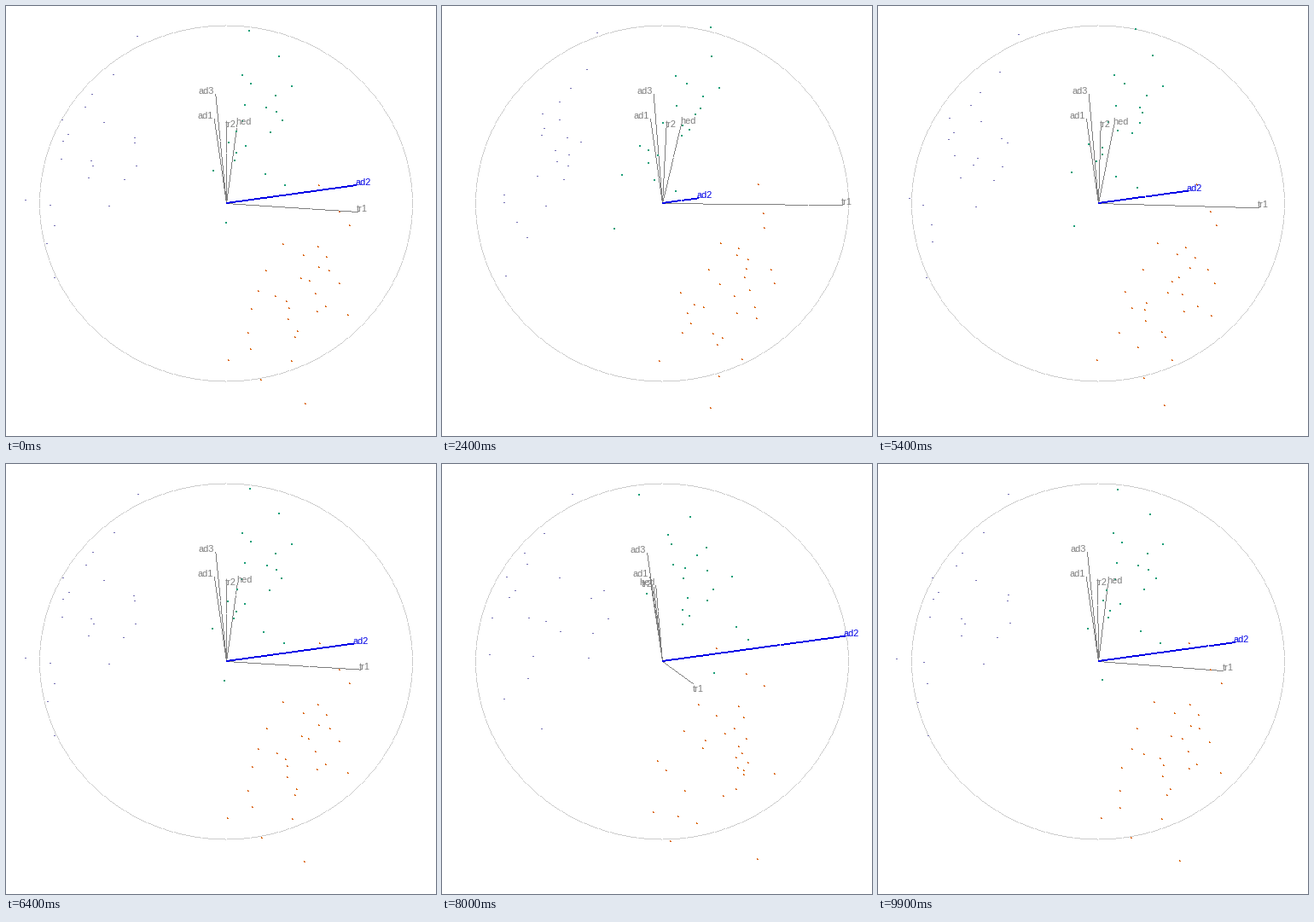
A matplotlib script for the animation above (10000 ms loop, 504x504 px).

```python
import numpy as np
import matplotlib.pyplot as plt
from matplotlib.animation import FuncAnimation

plt.rcParams["font.family"] = "Liberation Sans"

SIZE = 504
CX, CY = 257, 231
RX, RY = 218.5, 208.5
SLOPE = 0.144                    # direction of the manipulated variable
SKEW, LIFT = SLOPE * RX / RY, SLOPE * RY / RX
REACH = RX / np.hypot(1, SLOPE)

# Tour angle: out of the plane, fully into it, then back to the start.
START = 0.79
PHI = np.concatenate([
    np.linspace(START, np.pi / 2, 17),
    np.linspace(np.pi / 2, 0, 32),
    np.linspace(0, START, 17)[:-1],
])

# name: (in-plane part, out-of-plane part, constant height)
AXES = {
    "tr1": (0, 210, -30.5),
    "tr2": (0, 18, 87),
    "ad1": (0, 1, 99),
    "ad2": (REACH, 0, 0),
    "ad3": (0, 9, 127),
    "hed": (0, 36, 88),
}

# Pixels that make up one dot of each species.
SQUARE = [(0, 0), (1, 0), (0, 1), (1, 1)]
TRIANGLE = [(0, 0), (0, 1), (1, 1)]
DASH = [(0, 0), (1, 0)]

# Means, slopes against height, and spreads of the three parts.
SPECIES = [
    dict(color="#1b9e77", dot=SQUARE, n=21, mean=(42, 25, 87),
         slope=(-0.24, 0.53), spread=(32, 28, 53)),
    dict(color="#d95f02", dot=TRIANGLE, n=31, mean=(41, 47, -117),
         slope=(0.13, 0.49), spread=(45, 30, 55)),
    dict(color="#7570b3", dot=DASH, n=22, mean=(-117, -99, 74),
         slope=(0, 0.55), spread=(42, 20, 64)),
]

rng = np.random.default_rng(11)


def cluster(n, mean, slope, spread):
    """Heights at even logistic quantiles, the other parts scattered."""
    q = (np.arange(n) + 0.5) / n
    rise = spread[2] * 0.55 * np.log(q / (1 - q))
    noise = np.clip(rng.normal(size=(2, n)), -1.8, 1.8)
    a, b = (mean[i] + slope[i] * rise + spread[i] * noise[i] for i in (0, 1))
    return a, b, mean[2] + rise


def project(a, b, height, phi):
    r = a * np.cos(phi) + b * np.sin(phi)
    return CX + r - SKEW * height, CY - height - LIFT * r


def trace(xs, ys):
    """Whole pixels along a polyline, one per step of the longer side."""
    px, py = [], []
    for x0, y0, x1, y1 in zip(xs, ys, xs[1:], ys[1:]):
        n = int(max(abs(x1 - x0), abs(y1 - y0))) + 1
        px.append(np.rint(np.linspace(x0, x1, n)))
        py.append(np.rint(np.linspace(y0, y1, n)))
    return np.concatenate(px), np.concatenate(py)


def stamp(x, y, dot):
    """Pixel centres of a small pattern repeated at every position."""
    x, y = np.rint(x), np.rint(y)
    return (np.concatenate([x + dx + 0.5 for dx, _ in dot]),
            np.concatenate([y + dy + 0.5 for _, dy in dot]))


fig = plt.figure(figsize=(7, 7), dpi=72, facecolor="white")
ax = fig.add_axes([0, 0, 1, 1])
ax.set(xlim=(0, SIZE), ylim=(SIZE, 0))
ax.axis("off")


def pixels(color, zorder):
    return ax.plot([], [], ls="", marker=",", color=color, zorder=zorder)[0]


turn = np.linspace(0, 2 * np.pi, 121)
rim = trace(CX - 0.5 + RX * np.cos(turn), CY + RY * np.sin(turn))
pixels("#cccccc", 1).set_data(*stamp(*rim, [(0, 0)]))

arms = []
for name, parts in AXES.items():
    main = name == "ad2"
    color = "#0000e6" if main else "#7f7f7f"
    label = ax.text(0, 0, name, color=color, size=11, va="baseline", zorder=5)
    pen = [(0, 0), (0, -1)] if main else [(0, 0)]
    arms.append((pixels(color, 3 if main else 2), pen, label, parts))

clouds = [
    (pixels(s["color"], 4), s["dot"],
     cluster(s["n"], s["mean"], s["slope"], s["spread"]))
    for s in SPECIES
]


def place_label(label, x, y):
    """Push the label away from the middle of the stage."""
    off = x - SIZE / 2
    side = "center" if abs(off) < 0.75 else "left" if off > 0 else "right"
    label.set_ha(side)
    label.set_position((x, y + (10 if y > SIZE / 2 else 0)))


def draw(tick):
    # Double-length steps for the first seven seconds.
    phi = PHI[tick // 2 if tick < 70 else tick - 35]
    for line, pen, label, parts in arms:
        x, y = project(*parts, phi)
        line.set_data(*stamp(*trace([CX, x], [CY, y]), pen))
        place_label(label, x, y)
    for dots, dot, parts in clouds:
        dots.set_data(*stamp(*project(*parts, phi), dot))
    return []


anim = FuncAnimation(fig, draw, frames=100, interval=100, repeat=True,
                     repeat_delay=0)
plt.show()
```
